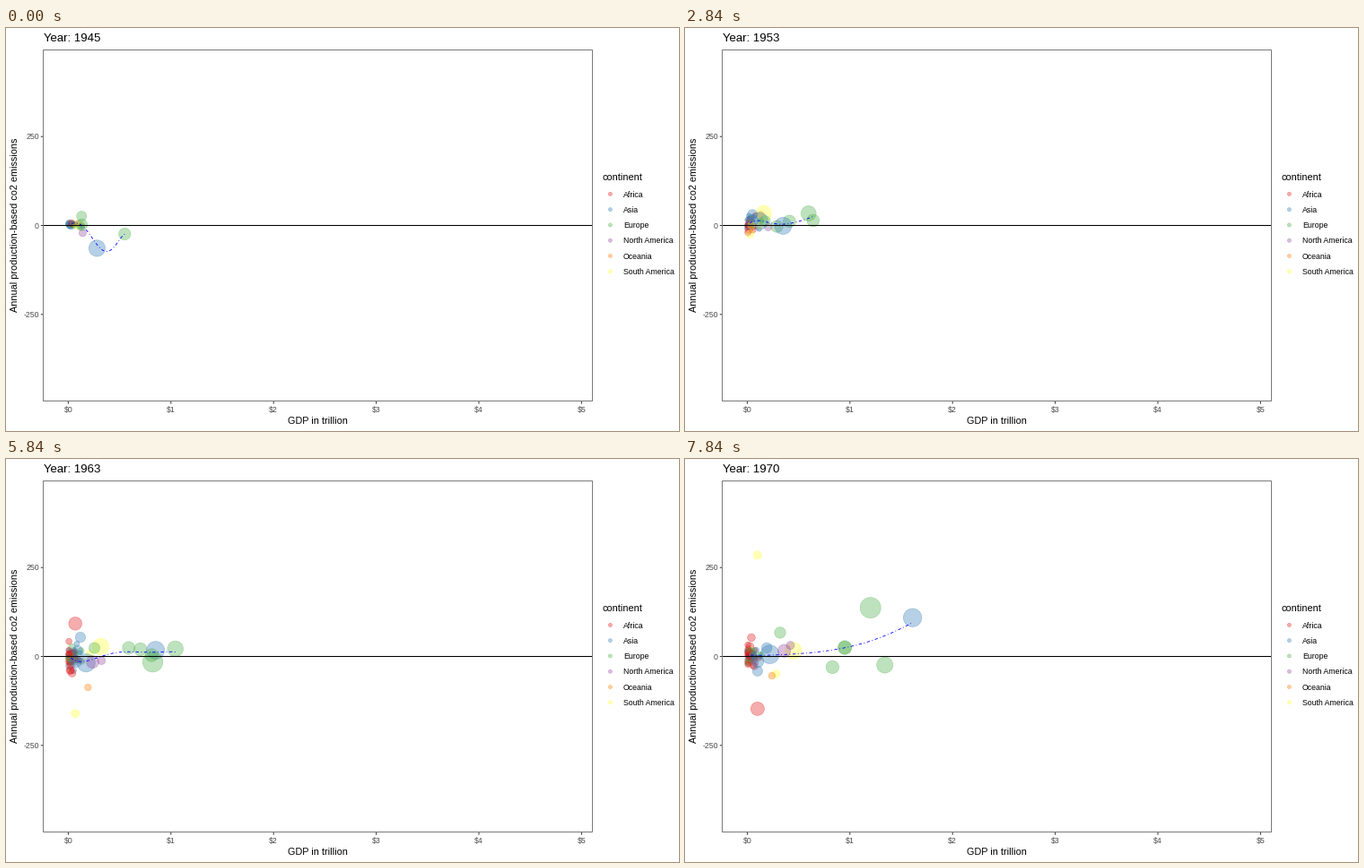
Write a matplotlib script that moves like this. It is 750x450 px and loops after 8000 ms.

```python
import numpy as np
import matplotlib.pyplot as plt
from matplotlib.animation import FuncAnimation
from matplotlib.colors import to_rgba
from matplotlib.patches import Rectangle

W, H, DPI = 750, 450, 100
PT = 72 / DPI                       # points per pixel
LOOP, INTERVAL = 8000, 40
HOLD, STEPS = 500, 23               # first pose is held, then three poses a second
ALPHA = 0.36
ZERO_X, ZERO_Y = 69.4, 220.5
TRILLION, UNIT = 114.4, 99.3 / 250  # pixels per axis unit

COLORS = {
    "Africa": "#E41A1C",
    "Asia": "#377EB8",
    "Europe": "#4DAF4A",
    "North America": "#984EA3",
    "Oceania": "#FF7F00",
    "South America": "#FFFF33",
}

plt.rcParams["font.family"] = "Liberation Sans"
fig = plt.figure(figsize=(W / DPI, H / DPI), dpi=DPI, facecolor="white")
ax = fig.add_axes([0, 0, 1, 1])
ax.set_xlim(0, W)
ax.set_ylim(H, 0)
ax.axis("off")


def label(x, y, text, size, color="black", ha="left", va="baseline", **kw):
    return ax.text(x, y, text, fontsize=size * PT, color=color, ha=ha, va=va, **kw)


def line(xs, ys, color, width, **kw):
    return ax.plot(xs, ys, color=color, lw=width * PT, solid_capstyle="butt",
                   snap=False, **kw)[0]


def dot_area(radii):
    return (2 * PT * (np.asarray(radii) - 0.35)) ** 2


def dot_colors(continents):
    return [to_rgba(COLORS[c], ALPHA) for c in continents]


def dots(xs, ys, radii, continents):
    rgba = dot_colors(continents)
    return ax.scatter(xs, ys, s=dot_area(radii), facecolors=rgba, edgecolors=rgba,
                      linewidths=0.7 * PT, zorder=2)


# Static chart
ax.add_patch(Rectangle((41.5, 24.5), 612, 392, fill=False, ec="#7A7A7A",
                       lw=PT, snap=False, zorder=5))
line([42, 653], [ZERO_Y, ZERO_Y], "black", 1.07, zorder=4)
for n in range(6):
    x = ZERO_X + n * TRILLION
    line([x, x], [417, 419.7], "#333333", 1)
    label(x, 429.2, f"${n}", 8.8, "#4D4D4D", "center")
for v in (-250, 0, 250):
    y = ZERO_Y - v * UNIT
    line([38.8, 41.5], [y, y], "#333333", 1)
    label(37, y + 3.2, str(v), 8.8, "#4D4D4D", "right")
label(347.5, 442, "GDP in trillion", 10.85, ha="center")
label(9.7, 220.3, "Annual production-based co2 emissions", 10.85,
      ha="center", va="center", rotation=90)
label(664.3, 170, "continent", 11)
legend_y = 185.4 + 17.28 * np.arange(len(COLORS))
for y, name in zip(legend_y, COLORS):
    label(688, y + 3.2, name, 8.8)
dots(np.full(len(COLORS), 673.4), legend_y, np.full(len(COLORS), 2.4), COLORS)
title = label(42, 14.8, "", 13.2)

economies = []


def economy(continent, first, gdp_start, gdp_end, radius, emissions, boom=1.4):
    """GDP eases up from step `first`; emissions are a few {step: change} keys."""
    def at(k):
        u = (k - first) / (STEPS - first)
        gdp = gdp_start + (gdp_end - gdp_start) * u ** boom
        change = np.interp(k, list(emissions), list(emissions.values()))
        return (ZERO_X + gdp * TRILLION, ZERO_Y - change * UNIT,
                radius * (0.9 + 0.1 * k / STEPS), continent)
    economies.append((first, at))


economy("South America", 0, 0.08, 0.28, 4.7, {12: 0, 19: 11, 23: -49})
economy("Africa", 0, 0.03, 0.04, 4.7, {0: 6, 12: 21, 15: -90, 19: -4, 23: 53})
economy("Oceania", 0, 0.10, 0.24, 4.2, {0: 6, 8: 31, 12: 4, 15: -98, 23: -54})
economy("South America", 3, 0.11, 0.45, 9.7, {3: 16, 8: 34, 15: 40, 19: 16})
economy("North America", 0, 0.14, 0.42, 4.9, {3: -21, 12: 9, 19: -20, 23: 31})
economy("Europe", 3, 0.32, 0.95, 7.8, {3: 34, 12: -6, 15: 19, 23: 24})
economy("Europe", 2, 0.30, 1.34, 9.4, {3: 54, 8: 34, 12: -24, 15: 52, 19: -9, 23: -24},
        boom=1)
economy("Asia", 1, 0.09, 0.22, 10.8, {3: 14, 12: 11, 15: -26, 23: 6})
economy("Asia", 8, 0.05, 0.19, 6.2, {8: 31, 12: 4, 15: 84, 19: 24})
economy("Asia", 8, 0.05, 0.10, 7.2, {8: 14, 15: -14})
economy("Asia", 14, 0.09, 0.10, 6, {15: 54, 19: -21, 23: -41})
economy("Europe", 0, 0.13, 0.83, 7.6, {0: 2, 12: -5, 15: 21, 19: 27, 23: -30})
economy("Asia", 0, 0.28, 1.61, 10.6, {0: -64, 3: 9, 12: -9, 19: 28, 23: 109}, boom=2.8)
economy("North America", 13, 0.19, 0.36, 7.5, {15: -26, 23: 16})
economy("Africa", 14, 0.06, 0.10, 7.9, {15: 137, 19: 48, 22: -235, 23: -147})
economy("Europe", 0, 0.13, 0.32, 6.6, {0: 26, 12: 6, 19: 31, 23: 67})
economy("Europe", 15, 0.76, 1.20, 11.9, {15: -84, 19: 53, 23: 137})
economy("Europe", 0, 0.55, 0.95, 7.8, {0: -24, 3: 11, 8: 14, 12: -15, 23: 26})
economy("South America", 8, 0.04, 0.10, 4.9,
        {12: 0, 14: -184, 15: -49, 18: -216, 19: -62, 23: 285})

# Crowd of small economies near the origin
rng = np.random.RandomState(7)
EARLY, CROWD = 14, 54
crowd_r = rng.uniform(2.8, 5, CROWD)
crowd_x = np.clip(69.5 + rng.exponential(4.5, CROWD), 66.3 + crowd_r, 86)
crowd_noise = np.clip(rng.standard_t(4, (STEPS + 1, CROWD)), -3, 3)
crowd_names = np.concatenate([
    rng.choice(["Europe", "Asia"], EARLY, p=[0.6, 0.4]),
    rng.choice(["Africa", "Asia", "Europe", "South America"], CROWD - EARLY,
               p=[0.42, 0.33, 0.17, 0.08]),
])


def crowd(k):
    n = int(np.interp(k, [3, 8, 13, 14, 23], [EARLY, 26, 28, 48, CROWD]))
    spread = np.interp(k, [3, 8, 15, 23], [1, 3.5, 6, 4])
    return zip(crowd_x[:n], ZERO_Y - 1 + spread * crowd_noise[k, :n],
               crowd_r[:n], crowd_names[:n])


def trend_curve(xs, ys, span=0.75, nodes=6):
    """Local quadratic fits at a few even nodes, joined by one smooth polynomial."""
    u = np.linspace(0, 1, nodes)
    left, width = xs.min(), np.ptp(xs)
    heights = []
    for x in left + width * u:
        distance = np.abs(xs - x)
        reach = np.sort(distance)[int(span * len(xs)) - 1]
        weight = np.clip(1 - (distance / reach) ** 3, 0, 1) ** 1.5
        heights.append(np.polyfit((xs - x) / reach, ys, 2, w=weight + 1e-3)[-1])
    fine = np.linspace(0, 1, 80)
    return left + width * fine, np.polyval(np.polyfit(u, heights, nodes - 1), fine)


def pose(k):
    big = [at(k) for first, at in economies if k >= first]
    xs, ys, radii, names = zip(*crowd(k), *big)
    xs, ys = np.array(xs), np.array(ys)
    return np.column_stack([xs, ys]), dot_area(radii), dot_colors(names), trend_curve(xs, ys)


poses = [pose(k) for k in range(STEPS + 1)]
cloud = dots([0], [0], [1], ["Asia"])
trend = line([], [], "blue", 0.85, linestyle=(0, (1, 3, 4, 3)), zorder=3)


def update(i):
    t = i * INTERVAL + INTERVAL / 2
    k = 0 if t < HOLD else min(STEPS, 1 + int((t - HOLD) * 3 / 1000))
    offsets, sizes, rgba, curve = poses[k]
    cloud.set_offsets(offsets)
    cloud.set_sizes(sizes)
    cloud.set_facecolors(rgba)
    cloud.set_edgecolors(rgba)
    trend.set_data(*curve)
    title.set_text(f"Year: {1945 + int(k * 12 / 11 + 0.2)}")
    return cloud, trend, title


anim = FuncAnimation(fig, update, frames=LOOP // INTERVAL, interval=INTERVAL,
                     repeat=True, repeat_delay=0, blit=False)
plt.show()
```
